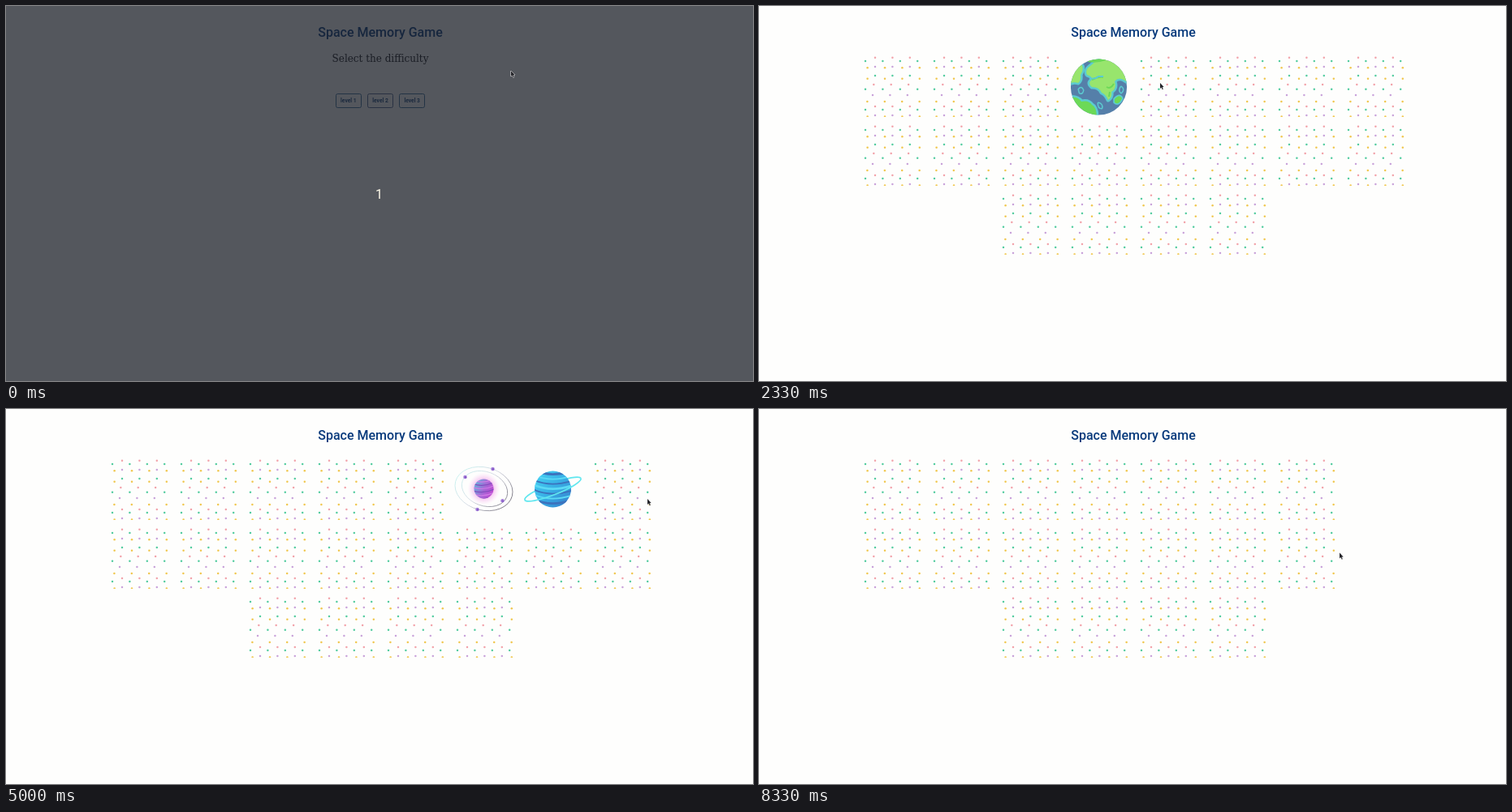
An HTML page with a canvas that plays this animation: 920 by 463 pixels, repeating every 8490 ms.

```html
<!DOCTYPE html>
<html lang="en">
<head>
<meta charset="utf-8">
<title>Space Memory Game</title>
<style>
html, body { margin: 0; width: 100%; height: 100%; overflow: hidden; background: #fefefd; }
canvas { display: block; width: 920px; height: 463px; }
</style>
</head>
<body>
<canvas id="stage" width="920" height="463"></canvas>
<script>
const LOOP = 8490;
const PITCH = 85;
const ctx = document.getElementById('stage').getContext('2d');

const GREEN = '#55cda0', PINK = '#f2a3aa', VIOLET = '#c9a3da', YELLOW = '#f0c74e';

// Dot rows on a card back: y, first x, count, colour
const DOT_ROWS = [
  [1.8, 14, 3, PINK], [6, 2, 4, GREEN], [13, 14, 3, VIOLET], [14.2, 4.6, 4, YELLOW],
  [24, 14, 3, GREEN], [27.8, 4.6, 4, YELLOW], [35, 12.3, 3, PINK], [40.8, 2, 4, GREEN],
  [48, 11, 3, VIOLET], [56, 4.4, 4, YELLOW], [62, 14, 3, PINK], [66, 2, 4, GREEN],
  [73, 14, 3, VIOLET], [74.6, 4.6, 4, YELLOW]
];

// Pointer tip: time, x, y
const POINTER = [
  [0, 622, 80], [330, 590, 90], [500, 535, 107], [670, 500, 113],
  [1500, 478, 110], [1670, 450, 106], [1830, 432, 104], [2000, 440, 102], [2170, 472, 98],
  [2330, 494, 95], [2500, 492, 105], [2670, 507, 109], [2830, 545, 101], [3000, 570, 94],
  [4000, 588, 99], [4170, 628, 104], [4330, 664, 105], [4500, 690, 107], [4670, 752, 109],
  [4830, 808, 110], [5000, 790, 111], [5170, 776, 107], [5330, 768, 105],
  [6000, 768, 112], [6170, 767, 132], [6330, 765, 158], [6500, 764, 176], [6670, 763, 182],
  [7000, 742, 184], [7170, 720, 182], [7330, 717, 181], [7500, 716, 180], [7670, 715, 180],
  [7830, 716, 179], [8170, 715, 179], [8330, 715, 177.5]
];

// Turned cards: column, row, from, to, face
const TURNS = [
  [3, 0, 1830, 3500, earth], [4, 0, 2500, 3500, ringed],
  [5, 0, 3830, 5330, atom], [6, 0, 4330, 5330, ringed],
  [7, 0, 5830, 7830, splash], [7, 1, 6830, 7830, splash]
];
const MATCHED = 7830;

function text(str, x, y, font, color) {
  ctx.font = font;
  ctx.fillStyle = color;
  ctx.textAlign = 'center';
  ctx.fillText(str, x, y);
}

function disc(x, y, r, fill) {
  ctx.beginPath();
  ctx.arc(x, y, r, 0, 7);
  ctx.fillStyle = fill;
  ctx.fill();
}

function oval(x, y, rx, ry, turn, color, width, from = 0, to = Math.PI * 2) {
  ctx.beginPath();
  ctx.ellipse(x, y, rx, ry, turn, from, to);
  ctx.strokeStyle = color;
  ctx.lineWidth = width;
  ctx.stroke();
}

function gradient(x0, y0, x1, y1, ...colors) {
  const g = ctx.createLinearGradient(x0, y0, x1, y1);
  colors.forEach((c, i) => g.addColorStop(i / (colors.length - 1), c));
  return g;
}

// Runs draw inside a circular clip
function inDisc(x, y, r, draw) {
  ctx.save();
  ctx.beginPath();
  ctx.arc(x, y, r, 0, 7);
  ctx.clip();
  draw();
  ctx.restore();
}

function shape(d, fill, edge, width) {
  const p = new Path2D(d);
  ctx.lineJoin = 'round';
  if (edge) {
    ctx.strokeStyle = edge;
    ctx.lineWidth = width;
    ctx.stroke(p);
  }
  if (fill) {
    ctx.fillStyle = fill;
    ctx.fill(p);
  }
}

function cardBack() {
  ctx.save();
  ctx.beginPath();
  ctx.rect(0, 0, 72, 75);
  ctx.clip();
  for (const [y, x, n, color] of DOT_ROWS)
    for (let i = 0; i < n; i++) disc(x + i * 21.4, y, 1.25, color);
  ctx.restore();
}

function earth() {
  const sea = '#557fa9', shore = '#5bcbd0', light = '#98e56d', grass = '#6cd957';
  inDisc(34.5, 38, 34.6, () => {
    ctx.fillStyle = sea;
    ctx.fillRect(0, 0, 72, 75);
    shape('M-2 34Q4 31 9 33Q13 30 12 23Q17 15 13 10L-4 8Z', light, shore, 5);
    shape('M-3 51Q8 49 13 56Q22 54 26 60Q32 63 32 76L-4 76Z', grass, shore, 5);
    shape('M24 12Q17 17 20 23Q27 25 26 29Q20 33 26 38Q35 38 38 45Q43 47 46 54Q51 51 50 44Q57 40 54 31Q60 23 72 34L72 6L42 -2Q34 3 24 12Z', light, shore, 5);
    shape('M21 7Q32 9 44 5L42 -2L28 -1Z', grass);
    shape('M26 29Q34 25 40 26M53 34Q49 41 44 38M48 44L47 50', null, grass, 2);
    shape('M23 27Q30 29 34 25L40 25', null, shore, 1.8);
    shape('M54 53Q60 46 63 52Q59 61 54 57Z', grass, shore, 3.5);
    shape('M62 38Q59 42 62 45Q66 41 62 38Z', sea, shore, 3);
    shape('M10 41Q13 37 15 42Q14 47 11 45Z', sea, shore, 3);
    shape('M34 58Q39 59 38 64Q34 64 34 58Z', sea, shore, 3);
  });
}

function ringed() {
  const x = 34.5, y = 37, tilt = -0.37, ring = '#60e7ef';
  oval(x, y, 37, 7, tilt, ring, 1.8, Math.PI, Math.PI * 2);
  inDisc(x, y, 22.5, () => {
    ctx.fillStyle = gradient(14, 16, 55, 58, '#45d3f3', '#38aee5', '#347fcd');
    ctx.fillRect(0, 0, 72, 75);
    for (let i = 0; i < 8; i++) {
      const sy = 17 + i * 6;
      shape(`M8 ${sy - 5}Q30 ${sy + 7} 60 ${sy - 3}`, null, i % 2 ? '#5bd9f5' : '#3c72bd', i % 3 ? 1.8 : 2.8);
    }
  });
  oval(x, y, 37, 7, tilt, ring, 1.8, 0, Math.PI);
}

function atom() {
  const x = 34.5, y = 36.5;
  const line = gradient(5, 12, 62, 60, '#c9f3f0', '#d9dce6', '#77747f');
  oval(x, y, 36, 26.5, 0.25, line, 1);
  oval(x + 1, y, 29, 21, 0.35, line, 1);
  const glow = ctx.createRadialGradient(x, y, 9, x, y, 20);
  glow.addColorStop(0, 'rgba(236,130,225,.65)');
  glow.addColorStop(1, 'rgba(246,190,240,0)');
  disc(x, y, 20, glow);
  inDisc(x, y, 12, () => {
    ctx.fillStyle = gradient(22, 30, 47, 42, '#62b9dc', '#a46bd6', '#c044d0');
    ctx.fillRect(0, 0, 72, 75);
    for (let i = 0; i < 6; i++) {
      const sy = 26 + i * 4.2;
      shape(`M20 ${sy}Q34 ${sy + 5} 48 ${sy - 2}`, null, i % 2 ? '#7f4dbd' : '#d07be6', 1.2);
    }
  });
  for (const [ex, ey] of [[11.5, 22], [45.5, 12], [57.5, 51.3], [26.5, 62]]) {
    disc(ex, ey, 2.3, '#a884dc');
    disc(ex + 0.4, ey + 0.3, 1.2, '#8558c4');
  }
}

function splash() {
  const plum = '#a948bd';
  inDisc(33, 33, 21.2, () => {
    ctx.fillStyle = gradient(22, 14, 42, 54, '#65f0f5', '#84bdeb', '#bd78df', '#c044d2');
    ctx.fillRect(0, 0, 72, 75);
    shape('M34 11Q43 22 37 30L48 34L58 24L48 11Z', 'rgba(169,139,226,.65)');
    shape('M13 39Q32 44 54 35L52 46Q35 54 18 48Z', '#df76ec');
    shape('M15 48Q34 53 49 45', null, '#b243cc', 1.5);
    for (const [x, y] of [[23, 44], [39, 45], [32, 49]]) disc(x, y, 1.5, '#b54acb');
  });
  shape('M-2 40Q4 41 10 38Q18 40 25 37Q35 39 44 34Q53 36 59 29Q64 28 62 25Q66 23 72 24Q70 30 64 31Q59 38 51 38Q44 38 38 41Q30 39 24 42Q17 41 12 43Q7 43 3 47Q0 45 2 43Z', plum);
  shape('M2 39Q8 35 14 35', null, '#c994d4', 0.7);
  disc(30, 42, 1.4, plum);
  disc(60.2, 37, 2.3, plum);
}

function menu() {
  text('Select the difficulty', 461, 69, '12px "DejaVu Serif", serif', '#171717');
  for (let i = 0; i < 3; i++) {
    const x = 406 + i * 39.2;
    ctx.beginPath();
    ctx.roundRect(Math.round(x) + 0.5, 108.5, 31, 17, 2);
    ctx.strokeStyle = i === 1 ? '#52688f' : '#3c7199';
    ctx.lineWidth = 1;
    ctx.stroke();
    text('level ' + (i + 1), x + 15.8, 119, 'bold 6.67px Roboto, sans-serif', '#174579');
  }
}

function board(t) {
  for (let row = 0; row < 3; row++) {
    const [first, last] = row < 2 ? [0, 7] : [2, 5];
    for (let col = first; col <= last; col++) {
      if (t >= MATCHED && col === 7 && row < 2) continue;
      const turn = TURNS.find(([c, r, a, b]) => c === col && r === row && t >= a && t < b);
      ctx.save();
      ctx.translate(129 + col * PITCH, 62 + row * PITCH);
      if (turn) turn[4](); else cardBack();
      ctx.restore();
    }
  }
}

function countdown() {
  ctx.fillStyle = 'rgba(27,31,40,.75)';
  ctx.fillRect(0, 0, 920, 463);
  text('1', 459.5, 237.5, '16px Roboto, sans-serif', '#fffbea');
}

function pointer(t) {
  let [, x, y] = POINTER[0];
  for (const [at, px, py] of POINTER) if (t >= at) [x, y] = [px, py];
  ctx.save();
  ctx.translate(x, y);
  shape('M0 0L0 7L1.6 5.6L2.7 8.2L3.8 7.7L2.7 5.2L4.6 5Z', '#25252a', '#f4f4f4', 1);
  ctx.restore();
}

function draw(t) {
  ctx.fillStyle = '#fefefd';
  ctx.fillRect(0, 0, 920, 463);
  text('Space Memory Game', 461, 38, '500 16px Roboto, sans-serif', '#083a7c');
  if (t < 830) menu();
  else if (t >= 1170) board(t);
  if (t < 170) countdown();
  pointer(t);
}

const start = performance.now();
function tick() {
  draw((performance.now() - start) % LOOP);
  requestAnimationFrame(tick);
}
tick();
</script>
</body>
</html>
```
